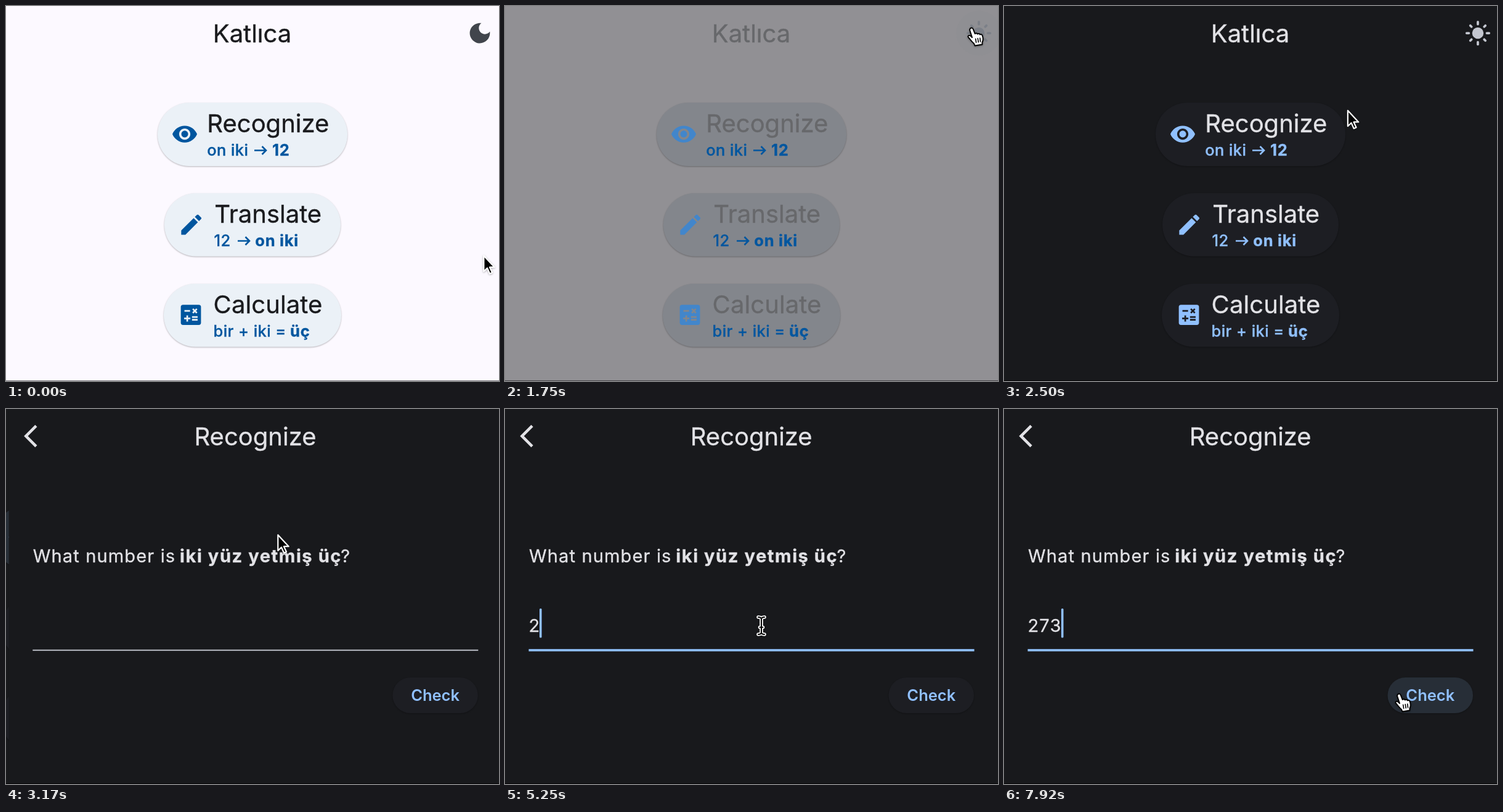
Animation, 800 px wide and 609 px high, one loop 8000 ms. Source, as an HTML page:

```html
<!DOCTYPE html>
<html lang="en">
<head>
<meta charset="utf-8">
<title>Number trainer</title>
<style>
html, body { margin: 0; width: 100%; height: 100%; overflow: hidden; background: #18191c; }
svg { display: block; width: 100vw; height: 100vh; font-family: Inter, "Noto Sans", sans-serif; font-optical-sizing: none; }
text { white-space: pre; stroke-width: .35; }
.bg { fill: var(--bg); }
.fg { fill: var(--fg); stroke: var(--fg); }
.card { fill: var(--card); filter: drop-shadow(0 1.6px 1.3px rgba(0,0,0,.28)); }
.icon { fill: var(--icon); }
.cut { fill: none; stroke: var(--card); stroke-width: 1.5; }
.bar { fill: var(--bar); }
.ray { stroke: var(--bar); stroke-width: 2.1; stroke-linecap: round; }
.sub { fill: var(--sub); stroke: var(--sub); font-size: 25.5px; font-weight: 500; letter-spacing: .4px; }
.arrow { fill: none; stroke: var(--sub); stroke-width: 2.6; }
.big { font-size: 40px; }
.light { fill: #e2e2e6; stroke: #e2e2e6; }
.body { font-size: 29.1px; letter-spacing: 1.1px; }
.b { font-weight: 700; }
.sub.b { letter-spacing: .75px; }
.body.b { letter-spacing: 1.55px; }
</style>
</head>
<body>
<svg id="stage" viewBox="0 0 800 609">
  <rect class="bg" width="800" height="609"/>
  <g id="home">
    <text class="fg big" x="399.5" y="59" text-anchor="middle">Katlıca</text>
    <circle id="halo" cx="768.8" cy="44" r="36.4"/>
    <g transform="translate(747.1 22.2) scale(1.82)">
      <path id="moon" class="bar" d="M12 3c-4.97 0-9 4.03-9 9s4.03 9 9 9 9-4.03 9-9c0-.46-.04-.92-.1-1.36-.98 1.37-2.58 2.26-4.4 2.26-2.98 0-5.4-2.42-5.4-5.4 0-1.81.89-3.42 2.26-4.4C12.92 3.04 12.46 3 12 3z"/>
      <g id="sun"><circle class="bar" cx="12" cy="12" r="5.1"/></g>
    </g>

    <rect id="first" class="card" x="246" y="157" width="308" height="103" rx="51.5"/>
    <path class="icon" fill-rule="evenodd" transform="translate(268.2 186.2) scale(1.82)" d="M12 4.5C7 4.5 2.73 7.61 1 12c1.73 4.39 6 7.5 11 7.5s9.27-3.11 11-7.5c-1.73-4.39-6-7.5-11-7.5zM12 17c-2.76 0-5-2.24-5-5s2.24-5 5-5 5 2.24 5 5-2.24 5-5 5zm0-8c-1.66 0-3 1.34-3 3s1.34 3 3 3 3-1.34 3-3-1.34-3-3-3z"/>
    <text class="fg big" x="326.3" y="205">Recognize</text>
    <text class="sub" x="326.3" y="243">on iki</text>
    <path class="arrow" d="M403 234.5h19m-6.5-6.5 6.5 6.5-6.5 6.5"/>
    <text class="sub b" x="432" y="243">12</text>

    <rect class="card" x="257" y="304" width="286" height="102.5" rx="51.2"/>
    <path class="icon" transform="translate(278.9 333.2) scale(1.82)" d="M3 17.25V21h3.75L17.81 9.94l-3.75-3.75zM20.71 7.04c.39-.39.39-1.02 0-1.41l-2.34-2.34c-.39-.39-1.02-.39-1.41 0l-1.83 1.83 3.75 3.75z"/>
    <text class="fg big" x="338.2" y="352">Translate</text>
    <text class="sub" x="337.5" y="390">12</text>
    <path class="arrow" d="M376 381.5h19m-6.5-6.5 6.5 6.5-6.5 6.5"/>
    <text class="sub b" x="404.3" y="390">on iki</text>

    <rect class="card" x="256" y="451" width="288" height="102.5" rx="51.2"/>
    <g transform="translate(278.2 479.7) scale(1.82)">
      <rect class="icon" x="3" y="3" width="18" height="18" rx="2"/>
      <path class="cut" d="M6.25 8.5h5M13.7 6.7l3.6 3.6m0-3.6-3.6 3.6M6 15.25h5.5M8.75 12.5V18M13 14h5M13 16.5h5"/>
    </g>
    <text class="fg big" x="336.6" y="498.5" letter-spacing=".1">Calculate</text>
    <text class="sub" x="336.6" y="537">bir + iki =</text>
    <text class="sub b" x="461" y="537">üç</text>

    <g id="tip">
      <rect x="534" y="88" width="253" height="46" rx="7" fill="#616161" opacity=".9"/>
      <text x="549" y="119" fill="#fff" font-size="21.8" letter-spacing=".45">Switch to dark mode</text>
    </g>
  </g>

  <g id="quiz">
    <rect class="bg" width="800" height="609"/>
    <path fill="#e2e2e6" transform="translate(13.4 22.2) scale(1.82)" d="M17.77 3.77 16 2 6 12l10 10 1.77-1.77L9.54 12z"/>
    <text class="big light" x="399.7" y="59" text-anchor="middle">Recognize</text>
    <text class="body light" x="39" y="249">What number is</text>
    <text class="body light b" x="277.3" y="249">iki yüz yetmiş üç</text>
    <text class="body light" x="538.5" y="249">?</text>
    <text class="body light" id="typed" x="38.5" y="362"></text>
    <rect id="line" x="38.5" width="723"/>
    <rect id="caret" y="324" width="3.6" height="47.5" rx="1.5" fill="#90c0ff"/>
    <rect id="check" class="card" x="622.5" y="436" width="138.5" height="58" rx="29"/>
    <text x="691.8" y="474" text-anchor="middle" fill="#90c0ff" font-size="25.5" font-weight="600">Check</text>
  </g>
  <rect id="edge" y="608" width="800" height="1"/>

  <g id="cursor" stroke-linejoin="round" stroke-linecap="round" style="filter:drop-shadow(0 1.5px 1.5px rgba(0,0,0,.3))">
    <path id="pointer" d="M1.3 2.5V28L7 22.6 11 31.7 15 30 10.9 21.2H18.7Z" fill="#000" stroke="#fff" stroke-width="2.2"/>
    <g id="hand" transform="translate(-5 -1)" stroke="#000">
      <path fill="#fff" stroke-width="1.9" d="M5 2.5C6.8.8 9 1.6 9.8 3.8L12.6 11C14 9.8 16 10 16.8 11.6 18.3 10.4 20.2 10.8 20.8 12.4 22.4 11.6 24 12.2 24.6 14 26.4 19 26.2 22 24.4 25V28.5L12.5 30.5 11 27C8 24.5 5.5 21 2 17 .4 15 2.6 12.6 5.4 14.6L8 17 4.4 6C4 4.4 4.2 3.3 5 2.5Z"/>
      <path fill="none" stroke-width="1.6" d="M13.6 19.2l1 6M17.2 18.6l1 6M20.7 18l.8 6"/>
    </g>
    <g id="beam" fill="none"></g>
  </g>
</svg>
<script>
const LOOP = 8000;
const $ = id => document.getElementById(id);
const show = (id, on) => $(id).style.display = on ? "" : "none";
const set = (id, attr, value) => $(id).setAttribute(attr, value);
const ramp = (t, a, b) => Math.min(1, Math.max(0, (t - a) / (b - a)));
const between = (t, a, b) => t >= a && t < b;

function mix(a, b, p) {
  const part = (hex, i) => parseInt(hex.slice(1 + 2 * i, 3 + 2 * i), 16);
  return "rgb(" + [0, 1, 2].map(i => Math.round(part(a, i) + (part(b, i) - part(a, i)) * p)) + ")";
}

// name: light, dark, start and end of the theme fade
const theme = {
  bg: ["#fcf9ff", "#18191c", 1657, 1857],
  fg: ["#1a1b1e", "#e2e2e6", 1672, 1877],
  card: ["#ebf1f7", "#1d1e23", 1650, 1850],
  icon: ["#00569f", "#90c0ff", 1660, 1860],
  sub: ["#00569f", "#90c0ff", 1785, 2010],
  bar: ["#41454c", "#c3c6cf", 1660, 1860]
};

// time, x, y of the cursor hotspot
const path = [
  [0, 774, 403], [120, 774, 403], [700, 772, 190], [1100, 749, 62], [1250, 745, 41],
  [1500, 755, 35], [1950, 755, 35], [2500, 557, 167], [2720, 440, 202], [3420, 440, 202],
  [4000, 416, 350], [4300, 416, 350], [4600, 416, 352], [6950, 416, 352],
  [7500, 600, 440], [7800, 639, 462], [LOOP, 639, 462]
];

function slope(i, k) {
  const a = path[i - 1], b = path[i], c = path[i + 1];
  if (!a || !c || a[k] === b[k] || b[k] === c[k]) return 0;
  return (c[k] - a[k]) / (c[0] - a[0]);
}

function cursorAt(t) {
  let i = 0;
  while (i < path.length - 2 && t >= path[i + 1][0]) i++;
  const a = path[i], b = path[i + 1], d = b[0] - a[0], u = (t - a[0]) / d;
  const h = u * u * (3 - 2 * u);
  return [1, 2].map(k => a[k] + (b[k] - a[k]) * h +
    d * u * (1 - u) * ((1 - u) * slope(i, k) - u * slope(i + 1, k)));
}

// time, typed text, caret position
const FOCUS = 4330;
const keys = [[FOCUS, "", 38], [5250, "2", 56], [5650, "27", 72.5], [6500, "273", 92.9]];

for (let i = 0; i < 8; i++)
  $("sun").innerHTML += `<path class="ray" transform="rotate(${i * 45} 12 12)" d="M12 ${i % 2 ? 2.5 : 2}V4"/>`;
$("beam").innerHTML = [["#fff", 5.5], ["#000", 2]].map(([color, w]) =>
  `<path stroke="${color}" stroke-width="${w}" d="M-5-14C-2-14 0-13 0-10.5V10.5C0 13-2 14-5 14M5-14C2-14 0-13 0-10.5V10.5C0 13 2 14 5 14M-2.5 2.5H2.5"/>`).join("");

function draw(t) {
  for (const [name, [light, dark, a, b]] of Object.entries(theme))
    $("stage").style.setProperty("--" + name, mix(light, dark, ramp(t, a, b)));
  const p = ramp(t, 1660, 1860);
  set("edge", "fill", mix("#77767a", "#050507", p));

  // theme button
  show("moon", t < 1660);
  show("sun", t >= 1660);
  set("halo", "fill", mix("#41454c", "#c3c6cf", p));
  set("halo", "opacity", .09 * (ramp(t, 1120, 1170) - ramp(t, 2060, 2110)));
  set("tip", "opacity", ramp(t, 1170, 1320) - ramp(t, 1640, 1715));

  // page change
  const e = 1 - Math.pow(1 - ramp(t, 2810, 3310), 4);
  set("home", "transform", `translate(${-267 * e} 0)`);
  set("quiz", "transform", `translate(${800 * (1 - e)} 0)`);
  show("home", e < 1);
  show("quiz", e > 0);

  // hovered buttons
  const hover = (id, h) => $(id).style.fill = h ? mix("#1d1e23", "#272e37", h) : "";
  hover("first", ramp(t, 2515, 2565));
  hover("check", ramp(t, 7610, 7660));

  // answer field
  const focus = ramp(t, FOCUS, FOCUS + 160);
  const thick = 1.9 + 1.8 * focus;
  set("line", "y", 391.7 - thick / 2);
  set("line", "height", thick);
  set("line", "fill", focus ? mix("#e2e2e6", "#90c0fa", focus) : t < 3720 ? "#c3c6cf" : "#e2e2e6");
  const last = keys.filter(k => t >= k[0]).pop() || keys[0];
  $("typed").textContent = last[1];
  set("caret", "x", last[2]);
  show("caret", t >= FOCUS && (t - last[0]) % 1000 < 500);

  // cursor
  const [x, y] = cursorAt(t);
  const hand = between(t, 1120, 2060) || between(t, 2515, 3000) || t >= 7610;
  const beam = between(t, 3720, 7220);
  set("cursor", "transform", `translate(${x} ${y})`);
  show("hand", hand);
  show("beam", beam);
  show("pointer", !hand && !beam);
}

const start = performance.now();
function tick() {
  draw((performance.now() - start) % LOOP);
  requestAnimationFrame(tick);
}
tick();
</script>
</body>
</html>
```
